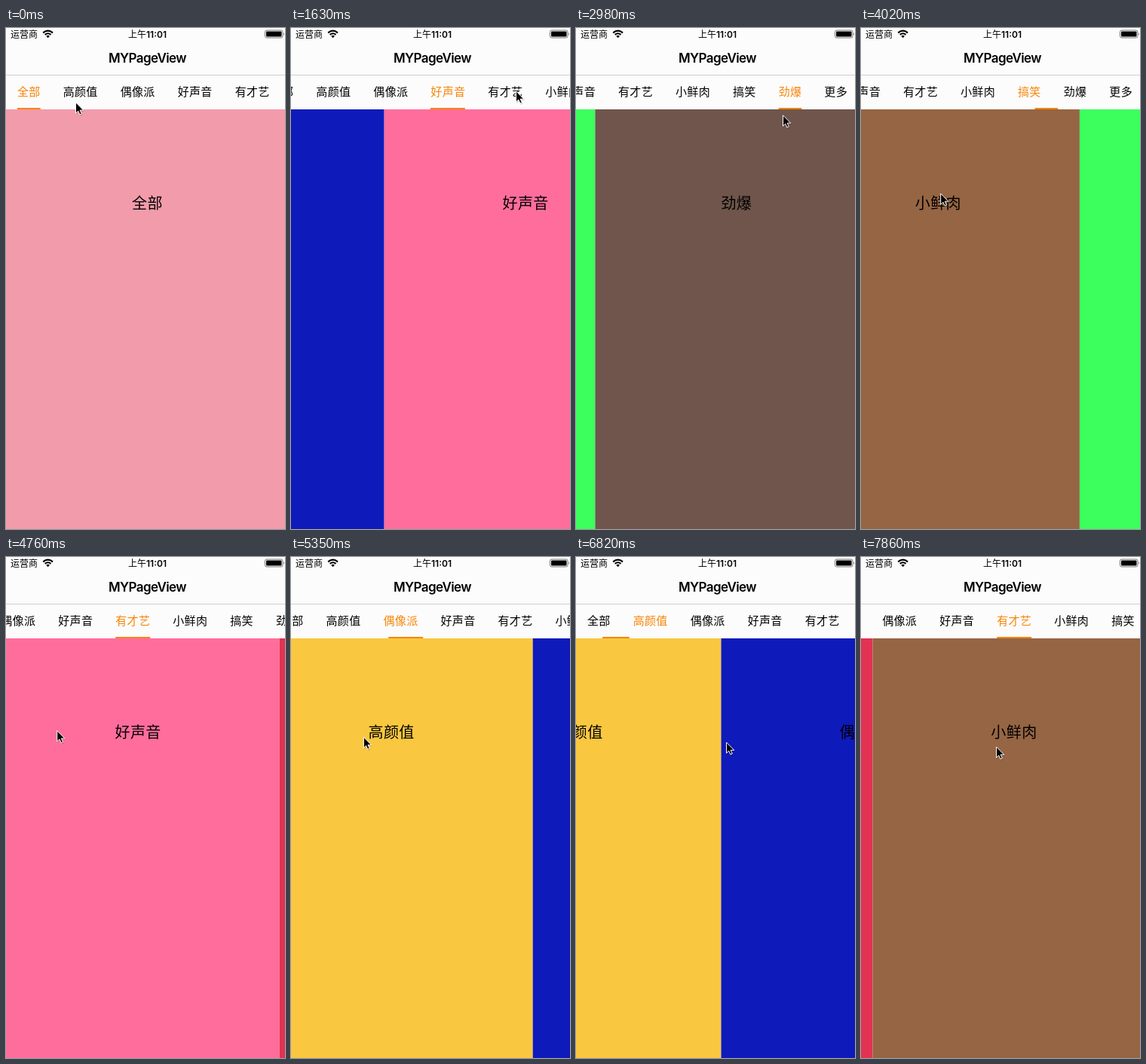
These frames come from a looping animation (370 px wide and 665 px high, 8000 ms). An HTML page:

```html
<!DOCTYPE html>
<html lang="zh-CN">
<head>
<meta charset="utf-8">
<title>MYPageView</title>
<style>
  html, body { margin: 0; width: 100%; height: 100%; overflow: hidden; background: #fcfcfc; }
  svg { display: block; width: 100%; height: 100%; }
  text { font-family: "Noto Sans CJK SC", "Noto Sans CJK", sans-serif; fill: #000; }
  .tab { font-size: 15px; letter-spacing: .33px; }
  .tab.on { fill: #f78508; }
  .label { font-size: 20px; letter-spacing: .4px; text-anchor: middle; }
  .status { font-size: 12px; }
  .latin { font-family: Inter, sans-serif; font-weight: 600; }
  .title { font-size: 17px; letter-spacing: -.6px; text-anchor: middle; }
</style>
</head>
<body>
<svg viewBox="0 0 370 665">
  <rect width="370" height="665" fill="#fcfcfc"/>
  <g id="pages"></g>
  <g id="tabs"></g>
  <rect id="line" y="106" height="2" fill="#f78508"/>

  <rect y="62" width="370" height="1" fill="#cfcfcf"/>
  <text class="status" x="6" y="12.7">运营商</text>
  <g fill="none" stroke="#000" stroke-width="2.1">
    <path d="M49.2 6.4Q55.6 .9 62 6.4M51.7 8.9Q55.6 5.6 59.5 8.9"/>
    <path d="M55.6 13.2L53.3 10.7Q55.6 8.9 57.9 10.7Z" fill="#000" stroke="none"/>
  </g>
  <text class="status" x="162" y="12.7" font-weight="500">上午<tspan class="latin">11:01</tspan></text>
  <rect x="343.5" y="3" width="23.5" height="10" rx="2.3" fill="none" stroke="#555" stroke-width=".8"/>
  <rect x="345" y="4.5" width="20.5" height="7" rx="1"/>
  <path d="M368 6.3q1.6 1.7 0 3.4z" fill="#555"/>
  <text class="latin title" x="187.5" y="46">MYPageView</text>

  <g id="cursor">
    <path d="M0 2v15l3.4-3.2 2.3 5 2.7-1.2-2.2-4.9h4.8z" opacity=".18"/>
    <path d="M-.5 .8v14.4l3.2-3.1 2.2 4.9 2.4-1.1-2.2-4.7h4.6z" stroke="#fff"/>
  </g>
</svg>
<script>
const LOOP = 8000, STEP = 148.3, PAGE = 375, CHAR = 46 / 3, GAP = 30, MARGIN = 15;
const names = ['全部', '高颜值', '偶像派', '好声音', '有才艺', '小鲜肉', '搞笑', '劲爆', '更多'];
const colors = ['#f29bab', '#f9c840', '#0f1abb', '#ff6d9c', '#e33253', '#966543', '#3cfe5d', '#6f554b'];

const byId = id => document.getElementById(id);
const mix = (a, b, p) => a + (b - a) * p;

function add(parent, tag, attrs, content = '') {
  const el = document.createElementNS('http://www.w3.org/2000/svg', tag);
  for (const key in attrs) el.setAttribute(key, attrs[key]);
  el.textContent = content;
  return parent.appendChild(el);
}

let edge = MARGIN;
const tabs = names.map(name => {
  const x = edge, w = name.length * CHAR;
  edge += w + GAP;
  return { x, w, el: add(byId('tabs'), 'text', { class: 'tab', x, y: 90 }, name) };
});
const maxScroll = edge - GAP + MARGIN - PAGE;

colors.forEach((fill, i) => {
  add(byId('pages'), 'rect', { x: i * PAGE, y: 108, width: PAGE, height: 557, fill });
  add(byId('pages'), 'text', { class: 'label', x: (i + .5) * PAGE, y: 240 }, names[i]);
});

const smooth = p => p * p * (3 - 2 * p);
const easeOut = p => 1 - (1 - p) ** 2;

// Steps page by page from one page to another at an even pace
function run(start, period, from, to) {
  const dir = Math.sign(to - from) || 1;
  return Array.from({ length: Math.abs(to - from) + 1 },
    (_, i) => ({ at: start + i * period, to: from + i * dir }));
}
const timed = (events, dur, ease) => events.map(e => ({ ...e, dur, ease }));

const BACK = { start: 3520.5, period: 326.5, end: 5806 };
const FORTH = { start: 6442, period: 294.7, end: LOOP };
const taps = [...run(220, 601, 1, 3), ...run(1675, 252, 4, 6), ...run(2680, 0, 7, 7)];
const swipes = [...run(BACK.start, BACK.period, 6, 0), ...run(FORTH.start, FORTH.period, 1, 5)];
// A swiped tab is picked only once its page has settled
const picks = [...taps, ...run(3875, 321, 6, 0), ...run(6737, 293.3, 1, 4)];

const scrollFor = i => Math.max(0, Math.min(maxScroll, tabs[i].x + tabs[i].w / 2 - PAGE / 2));
const moves = [...timed(taps, 340, smooth), ...timed(swipes, 300, easeOut)];
const lineMoves = timed(picks, 220, smooth);
const scrolls = timed(picks.map(({ at, to }) => ({ at, to: scrollFor(to) })), 340, smooth);

// Each event starts from wherever the previous one was interrupted
function follow(events, t) {
  let value = 0;
  events.forEach((e, i) => {
    if (e.at > t) return;
    const end = Math.min(t, events[i + 1]?.at ?? t);
    value = mix(value, e.to, e.ease(Math.min(1, (end - e.at) / e.dur)));
  });
  return value;
}

// Key points of the hand: time, x, y
const hand = [[0, 93, 98], [230, 93, 98], [1422, 250, 85], [1631, 299, 83], [1930, 275, 86],
  [2690, 275, 86], [2966, 275, 115], [BACK.start, 97, 212], [BACK.end, 118, 245],
  [FORTH.start, 226, 243], [LOOP, 159, 252]];

function wobble(t, { start, period, end }, wave) {
  return t >= start && t < end ? 40 * wave((t - start) / period * 2 * Math.PI) : 0;
}

function cursorAt(t) {
  const i = hand.findIndex(([at]) => at > t);
  const [t0, x0, y0] = hand[i - 1], [t1, x1, y1] = hand[i];
  const p = (t - t0) / (t1 - t0);
  return [mix(x0, x1, p) + wobble(t, BACK, Math.sin) + wobble(t, FORTH, Math.cos), mix(y0, y1, p)];
}

const shift = (id, x, y = 0) => byId(id).setAttribute('transform', `translate(${x} ${y})`);

function draw(now) {
  // The screen refreshes in coarse steps
  const t = Math.floor((now % LOOP + 8) / STEP) * STEP;
  const scroll = follow(scrolls, t);
  shift('pages', -follow(moves, t) * PAGE);
  shift('tabs', -scroll);
  shift('cursor', ...cursorAt(t));

  const pos = follow(lineMoves, t), i = Math.floor(pos);
  const a = tabs[i], b = tabs[i + 1];
  byId('line').setAttribute('x', mix(a.x, b.x, pos - i) - scroll);
  byId('line').setAttribute('width', mix(a.w, b.w, pos - i));

  const picked = picks.findLast(e => e.at <= t)?.to ?? 0;
  tabs.forEach((tab, n) => tab.el.classList.toggle('on', n === picked));
}

let start;
function tick(now) {
  start ??= now;
  draw(Math.max(0, now - start));
  requestAnimationFrame(tick);
}
draw(0);
requestAnimationFrame(tick);
</script>
</body>
</html>
```
